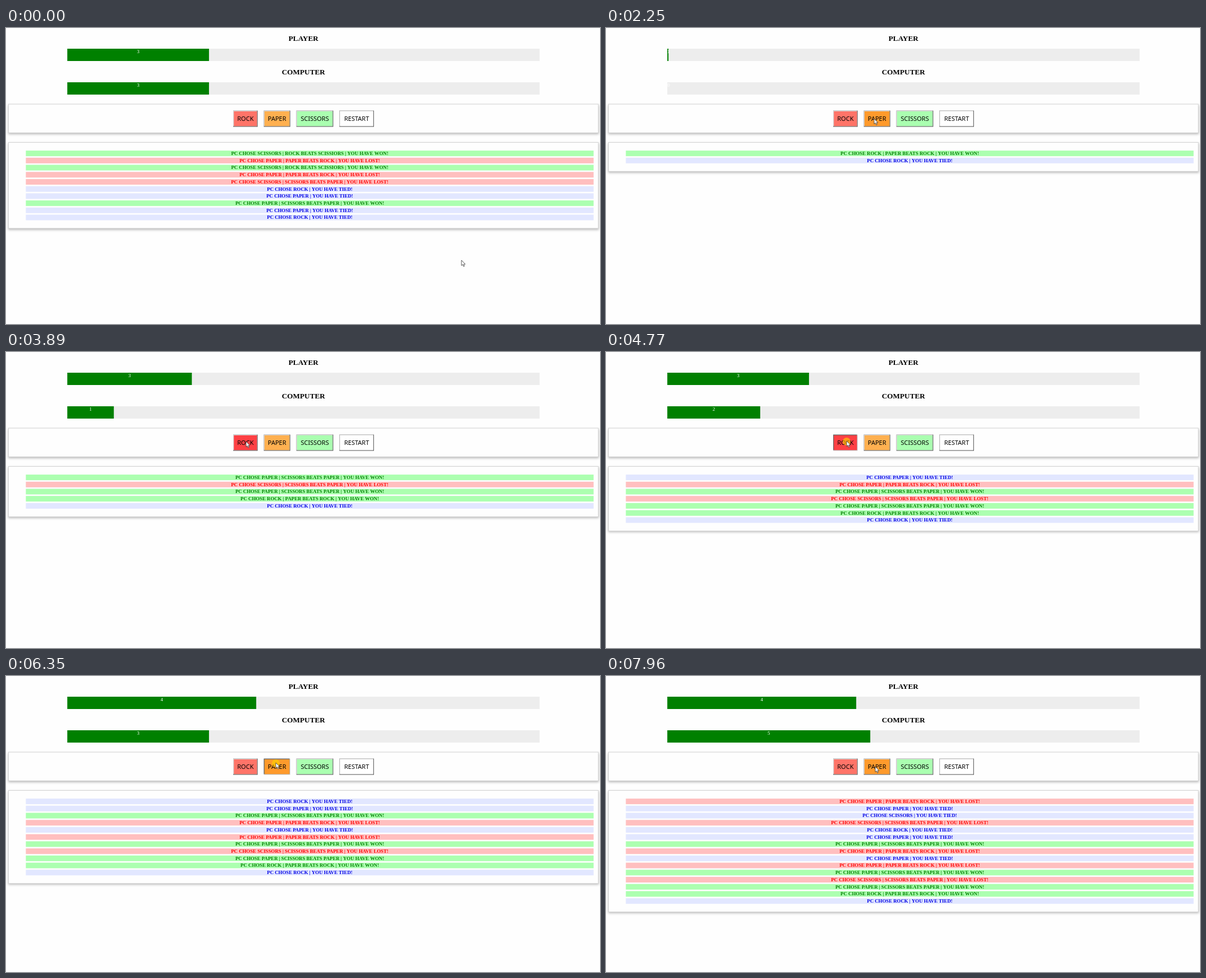
An HTML page with a canvas that plays this animation: 1059 px wide and 529 px high, repeating every 8 s.

```html
<!DOCTYPE html>
<html lang="en">
<head>
<meta charset="utf-8">
<title>Rock Paper Scissors</title>
<style>
html, body { margin: 0; width: 100%; height: 100%; overflow: hidden; background: #fefefe; }
canvas { display: block; }
</style>
</head>
<body>
<canvas id="stage" width="1059" height="529"></canvas>
<script>
const ctx = document.getElementById('stage').getContext('2d');
const LOOP = 8000, RESET = 600, LAG = 40, BAR_MS = 1000;
const SERIF = '"Liberation Serif", "Times New Roman", serif';
const SANS = '"Noto Sans", "Open Sans", sans-serif';
const NAMES = { r: 'ROCK', p: 'PAPER', s: 'SCISSORS' };
const BEATS = { r: 's', p: 'r', s: 'p' };
const STYLE = {
  WON: ['#acffb0', '#008000'],
  LOST: ['#ffbfbf', '#ff0000'],
  TIED: ['#e2e7ff', '#0000e6']
};
const BUTTONS = [
  { label: 'ROCK', x: 405, w: 43.7, fill: '#ff7468', hover: '#ff4044' },
  { label: 'PAPER', x: 459.6, w: 47.2, fill: '#ffb050', hover: '#ff9a2c' },
  { label: 'SCISSORS', x: 517.7, w: 65.8, fill: '#aaffb0', hover: '#7dff88' },
  { label: 'RESTART', x: 594.3, w: 61.7, fill: '#ffffff', hover: '#eeeeee' }
];

// Moves are written as player then computer, oldest first.
const OLD_MOVES = 'rr pp sp pp rr ps rp rs rp rs'.split(' ');
const PLAYS = [
  [1860, 'rr', 428, 160], [2250, 'pr', 478, 162], [2650, 'sp', 549, 162],
  [3090, 'ps', 475, 164], [3560, 'sp', 548, 162], [4040, 'rp', 428, 160],
  [4420, 'pp', 479, 161], [4850, 'rp', 429, 159], [5260, 'sp', 548, 161],
  [5650, 'pp', 480, 161], [6020, 'rr', 429, 160], [6440, 'ps', 481, 155],
  [6930, 'ss', 548, 162], [7330, 'pp', 482, 166], [7800, 'rp', 430, 160]
].map(([at, move, x, y]) => ({ at, move, x, y }));
const CLICKS = [RESET, ...PLAYS.map(p => p.at)];

const path = [[0, 812, 415], [70, 812, 415], [450, 628, 162], [650, 628, 162],
  [880, 622, 160], [1230, 470, 150]];
for (const p of PLAYS) path.push([p.at - 150, p.x, p.y], [p.at + 10, p.x, p.y]);
path.push([7950, 480, 162], [LOOP, 480, 162]);

const outcome = ([me, pc]) => me === pc ? 'TIED' : BEATS[me] === pc ? 'WON' : 'LOST';

function describe(move) {
  const [me, pc] = move, result = outcome(move);
  const [win, lose] = result === 'WON' ? [me, pc] : [pc, me];
  const loser = lose === 's' ? 'SCISSIORS' : NAMES[lose];
  const middle = result === 'TIED' ? '' : `${NAMES[win]} BEATS ${loser} | `;
  return `PC CHOSE ${NAMES[pc]} | ${middle}YOU HAVE ${result}!`;
}

function ease(x) {
  if (x >= 1) return 1;
  let lo = 0, hi = 1;
  for (let i = 0; i < 20; i++) {
    const s = (lo + hi) / 2;
    if (0.75 * s * (1 - s) + s ** 3 < x) lo = s; else hi = s;
  }
  const s = lo, q = 1 - s;
  return 0.3 * q * q * s + 3 * q * s * s + s ** 3;
}

function scoreEvents(result) {
  const wins = PLAYS.filter(p => outcome(p.move) === result);
  return [{ at: RESET, score: 0 }, ...wins.map((p, i) => ({ at: p.at, score: i + 1 }))];
}
const BARS = [
  { title: 'PLAYER', y: 37, events: scoreEvents('WON') },
  { title: 'COMPUTER', y: 97, events: scoreEvents('LOST') }
];

function barAt(events, t) {
  let score = 3, level = 3, last = null;
  const value = time => last
    ? last.from + (score - last.from) * ease((time - last.at + LAG) / BAR_MS) : level;
  for (const e of events) {
    if (e.at > t) break;
    const from = value(e.at - LAG);
    last = { at: e.at, from };
    score = e.score;
  }
  return { score, level: value(t) };
}

function cursorAt(t) {
  let i = 1;
  while (i < path.length - 1 && path[i][0] < t) i++;
  const [t0, x0, y0] = path[i - 1], [t1, x1, y1] = path[i];
  const k = Math.min(1, Math.max(0, (t - t0) / (t1 - t0))), s = k * k * (3 - 2 * k);
  return { x: x0 + (x1 - x0) * s, y: y0 + (y1 - y0) * s };
}

function rect(x, y, w, h, color) {
  ctx.fillStyle = color;
  ctx.fillRect(x, y, w, h);
}

function text(str, x, y, font, color) {
  ctx.font = font;
  ctx.fillStyle = color;
  ctx.textAlign = 'center';
  ctx.fillText(str, x, y);
}

function panel(y, bottom) {
  ctx.save();
  ctx.shadowColor = 'rgba(0,0,0,.25)';
  ctx.shadowBlur = 4;
  ctx.shadowOffsetY = 2;
  rect(4, y, 1052.5, bottom - y, '#d2d2d2');
  ctx.restore();
  rect(5, y + 1, 1050.5, bottom - y - 2, '#fefefe');
}

function drawBar({ title, y, events }, t) {
  const { score, level } = barAt(events, t), w = level * 84.2;
  text(title, 530.3, y - 14.5, `bold 13.2px ${SERIF}`, '#000');
  rect(109.3, y, 842, 22, '#ededed');
  rect(109.3, y, w, 22, '#008000');
  text(score, 109.3 + Math.max(w, 4.4) / 2, y + 8, `8.8px ${SERIF}`, '#fff');
}

function drawButton(b, cursor, pressed) {
  const y = 147.6, h = 29;
  const over = cursor.x >= b.x && cursor.x <= b.x + b.w && cursor.y >= y && cursor.y <= y + h;
  const light = '#d5d5d5', dark = '#666666', edge = 1.3;
  const down = over && pressed;
  rect(b.x, y, b.w, h, down ? light : dark);
  rect(b.x, y, b.w - edge, h - edge, down ? dark : light);
  rect(b.x + edge, y + edge, b.w - 2 * edge, h - 2 * edge, over ? b.hover : b.fill);
  text(b.label, b.x + b.w / 2, 166, `11px ${SANS}`, '#000');
}

function drawLog(t) {
  const moves = t < RESET ? OLD_MOVES : PLAYS.filter(p => p.at <= t).map(p => p.move);
  const n = moves.length;
  panel(204, n ? 231.3 + 12.72 * n : 225.3);
  moves.forEach((move, i) => {
    const y = 219.1 + (n - 1 - i) * 12.72;
    const [back, ink] = STYLE[outcome(move)];
    rect(35.4, y, 1012.2, 10, back);
    text(describe(move), 541.5, y + 7.9, `bold 8.8px ${SERIF}`, ink);
  });
}

function drawCursor({ x, y }, pressed) {
  if (pressed) {
    ctx.beginPath();
    ctx.arc(x, y + 1, 7, 0, Math.PI * 2);
    ctx.fillStyle = 'rgba(255,212,0,.62)';
    ctx.fill();
  }
  const arrow = new Path2D('M0 0V9.6L2.2 7.6L3.8 11.2L5.4 10.5L3.9 7.1H6.8Z');
  ctx.save();
  ctx.translate(x, y);
  ctx.fillStyle = '#fff';
  ctx.strokeStyle = '#333';
  ctx.lineWidth = 0.8;
  ctx.fill(arrow);
  ctx.stroke(arrow);
  ctx.restore();
}

function draw(t) {
  const cursor = cursorAt(t);
  const pressed = CLICKS.some(at => t >= at - 120 && t < at);
  rect(0, 0, 1059, 529, '#fefefe');
  for (const bar of BARS) drawBar(bar, t);
  panel(135.6, 187.8);
  for (const b of BUTTONS) drawButton(b, cursor, pressed);
  drawLog(t);
  drawCursor(cursor, pressed);
}

const start = performance.now();
function tick() {
  draw((performance.now() - start) % LOOP);
  requestAnimationFrame(tick);
}
tick();
</script>
</body>
</html>
```
